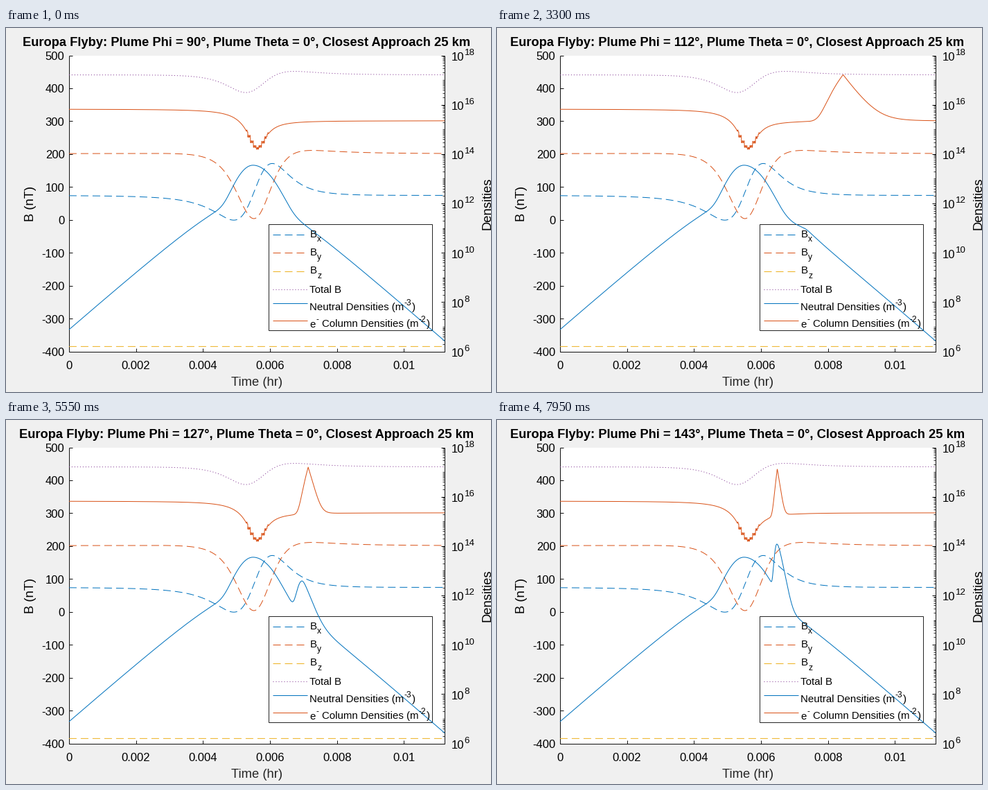
Animation of 700x525 px, one loop 8 s. Source, as a matplotlib script:

```python
import numpy as np
import matplotlib.pyplot as plt
from matplotlib.animation import FuncAnimation
from matplotlib.patches import Rectangle

W, H, DPI = 700, 525, 100
PX = 72 / DPI  # points per pixel
LEFT, RIGHT, TOP, BOTTOM = 90.4, 632.4, 39, 466
DECADE = (BOTTOM - TOP) / 12
BLUE, ORANGE, YELLOW, PURPLE = "#0072BD", "#D95319", "#EDB120", "#7E2F8E"
DASHED, DOTTED = (0, (11 * PX, 6 * PX)), (0, (1 * PX, 3 * PX))
LABEL, TICK, LEGEND, SCRIPT = 18.33, 16.67, 15, 12
CENTER, REACH = 362.4, 55.2  # closest approach: position and distance

plt.rcParams["font.family"] = "Liberation Sans"
plt.rcParams["lines.scale_dashes"] = False

fig = plt.figure(figsize=(W / DPI, H / DPI), dpi=DPI, facecolor="#f0f0f0")
ax = fig.add_axes([0, 0, 1, 1])
ax.set_xlim(-0.5, W - 0.5)
ax.set_ylim(H - 0.5, -0.5)
ax.axis("off")


def text(x, y, s, size=TICK, ha="left", **kw):
    return ax.text(x, y, s, fontsize=size * PX, ha=ha, va="baseline",
                   rotation_mode="anchor", zorder=4, **kw)


def line(x, y, color="#111111", style="-", width=1.0):
    return ax.plot(x, y, color=color, ls=style, lw=width * PX, zorder=3,
                   dash_capstyle="butt", solid_capstyle="butt")[0]


def field_y(b):
    """Pixel height of a field strength in nT."""
    return TOP + (500 - b) * (BOTTOM - TOP) / 900


def add_log(y1, y2):
    """Pixel height of the sum of two densities on the log axis."""
    scale = np.log(10) / DECADE
    return -np.logaddexp(-y1 * scale, -y2 * scale) / scale


X = np.arange(LEFT, RIGHT + 0.5, 0.25)
DX = X - CENTER
SIGHT = np.degrees(np.arctan2(REACH, DX))  # angle seen from the plume base


def induced_field(mx=-37, my=-96):
    """Constant background plus a dipole passed on a straight line."""
    u = DX / REACH
    r5 = (1 + u * u) ** 2.5
    bx = 74.5 + (mx * (2 * u * u - 1) - 3 * my * u) / r5
    by = 201 + (my * (2 - u * u) - 3 * mx * u) / r5
    return bx, by, np.full_like(X, -385)


def quiet_neutral():
    atmosphere = 199.3 + 0.88 * np.hypot(X - 352, REACH)
    off = X - 356
    plume = 198 + np.where(off < 0, 0.04, 0.025) * off ** 2
    return add_log(atmosphere, plume)


def quiet_column():
    near = np.abs(DX) < 16
    dx = np.where(near, np.round(DX / 4) * 4, DX)  # coarse steps in the dip
    level = np.where(dx < 0, 116.5, 133.3)
    width = np.where(dx < 0, 18, 15)
    ripple = 1.3 * near * np.sign(np.sin(2 * np.pi * X / 2.2))
    return level + (173 - level) / (1 + (dx / width) ** 2) + ripple


NEUTRAL, COLUMN = quiet_neutral(), quiet_column()


def column_curve(tilt):
    steep = (tilt / 53) ** 4
    delta = SIGHT - tilt
    off = np.abs(delta)
    drop = (8.9 * off + 0.35 * off ** 2) * np.where(delta > 0, 1 + 0.35 * steep, 1)
    return add_log(COLUMN, 67 + 3 * steep + drop)


def neutral_curve(tilt):
    d = tilt - 31
    axis = CENTER + REACH / np.tan(np.radians(max(tilt, 1)))
    dx = X - axis + np.exp(3 - 0.125 * d - 0.0015 * d * d)
    peak = 260 - 4.95 * d + 0.057 * d * d
    rise = np.exp(-1.75 + 0.097 * d) * dx ** 2
    fall = 2.2 * np.exp(0.04 * d) * (np.hypot(dx, 4) - 4)
    return add_log(NEUTRAL, peak + np.where(dx < 0, rise, fall))


def draw_axes():
    ax.add_patch(Rectangle((LEFT, TOP), RIGHT - LEFT, BOTTOM - TOP, fc="white", lw=0))
    for x in (LEFT, RIGHT):
        line([x, x], [TOP, BOTTOM])
    line([LEFT, RIGHT], [BOTTOM, BOTTOM])
    for i in range(6):
        x = LEFT + 96.7 * i
        line([x, x], [BOTTOM, BOTTOM - 5])
        text(x, 491, f"{0.002 * i:.2g}" if i else "0", ha="center")
    for b in range(-400, 501, 100):
        y = field_y(b)
        line([LEFT, LEFT + 5], [y, y])
        text(84, y + 6.5, str(b), ha="right")
    for i in range(13):
        y = BOTTOM - DECADE * i
        if i % 2 == 0:
            line([RIGHT - 5, RIGHT], [y, y])
            text(642, y + 7.5, "10")
            text(661, y - 0.5, str(6 + i), 13.3)
        for k in range(1, 10 if i < 12 else 1):
            ym = y - DECADE * np.log10(k)
            line([RIGHT - 3, RIGHT], [ym, ym], width=0.8)
    text(362, 515, "Time (hr)", LABEL, "center", color="#262626")
    text(40, 253, "B (nT)", LABEL, "center", rotation=90)
    text(699, 253, "Densities", LABEL, "center", rotation=90)


def draw_legend():
    ax.add_patch(Rectangle((378, 282), 236, 153, fc="white", ec="#262626",
                           lw=PX, zorder=2))
    rows = [(297, BLUE, DASHED), (323, ORANGE, DASHED), (350, YELLOW, DASHED),
            (376, PURPLE, DOTTED), (396, BLUE, "-"), (421, ORANGE, "-")]
    for y, color, style in rows:
        line([384, 434], [y, y], color, style)
    for i, axis in enumerate("xyz"):
        text(438, 301 + 26.3 * i, "B", LEGEND)
        text(448.5, 307.5 + 26.3 * i, axis, SCRIPT)
    text(438, 381, "Total B", LEGEND)
    text(438, 406, "Neutral Densities (m", LEGEND)
    text(574, 399, "-3", SCRIPT)
    text(585.5, 406, ")", LEGEND)
    text(438, 431, "e", LEGEND)
    text(446.5, 424, "-", SCRIPT)
    text(455, 431, "Column Densities (m", LEGEND)
    text(595, 424, "-2", SCRIPT)
    text(606.5, 431, ")", LEGEND)


draw_axes()
draw_legend()
field = induced_field()
for b, color in zip(field, (BLUE, ORANGE, YELLOW)):
    line(X, field_y(b), color, DASHED)
line(X, field_y(np.linalg.norm(field, axis=0)), PURPLE, DOTTED)
neutral = line(X, NEUTRAL, BLUE)
column = line(X, COLUMN, ORANGE)
title = text(346.5, 26, "", LABEL, "center", weight="bold")


def update(frame):
    tilt = frame // 3
    title.set_text(f"Europa Flyby: Plume Phi = {90 + tilt}°, Plume Theta = 0°, "
                   "Closest Approach 25 km")
    neutral.set_ydata(neutral_curve(tilt))
    column.set_ydata(column_curve(tilt))
    return title, neutral, column


anim = FuncAnimation(fig, update, frames=160, interval=50, repeat=True,
                     repeat_delay=0, blit=False)
plt.show()
```
